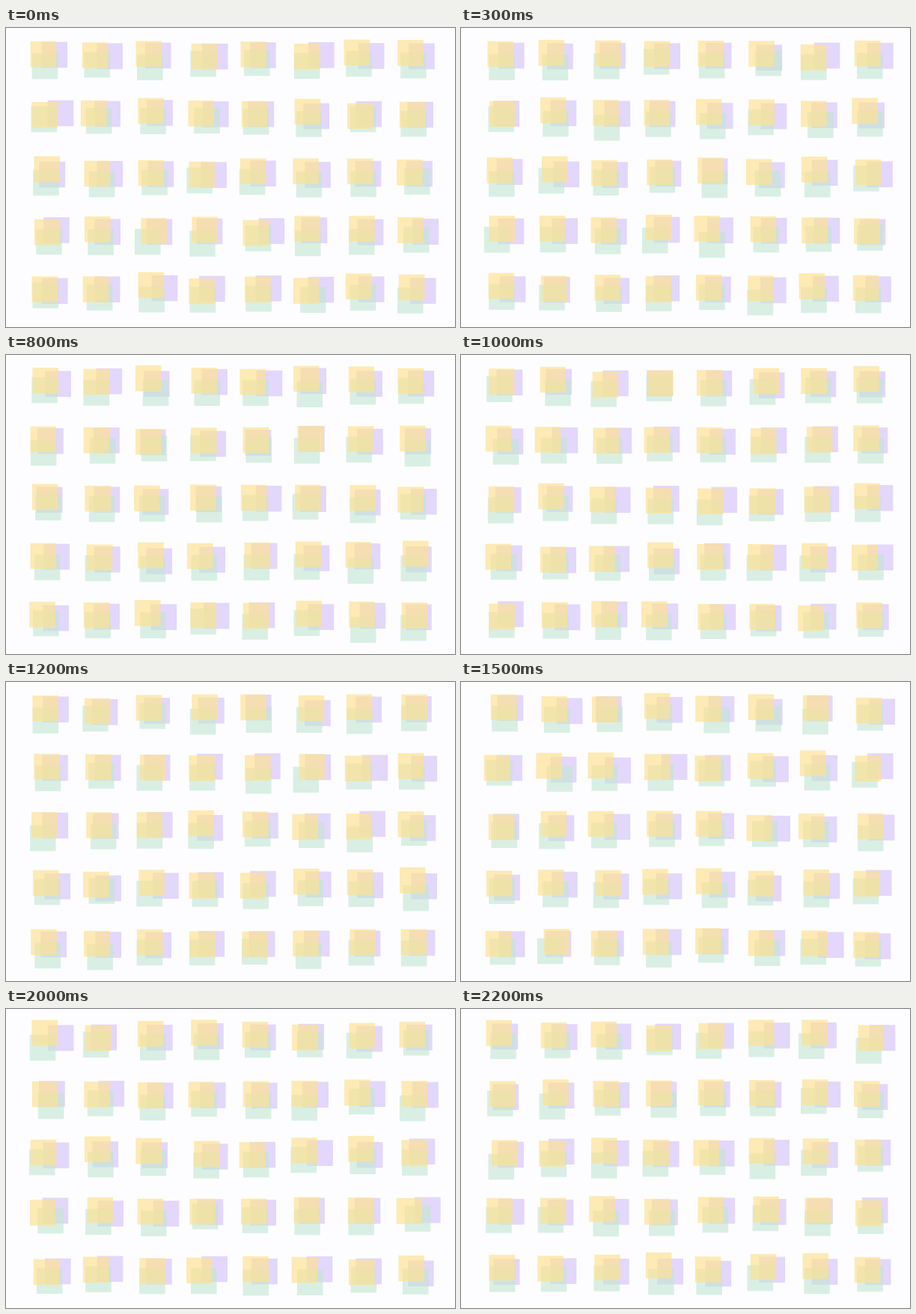
Write an HTML page with a canvas that moves like this. It is 600 by 400 pixels and loops after 2300 ms.

```html
<!DOCTYPE html>
<html>
<head>
<meta charset="utf-8">
<style>
html, body { margin: 0; width: 100%; height: 100%; overflow: hidden; background: #fdfdff; }
canvas { display: block; }
</style>
</head>
<body>
<canvas id="stage" width="600" height="400"></canvas>
<script>
const ctx = document.getElementById('stage').getContext('2d');
const STEP = 100, STEPS = 23, SIZE = 34.6;

// Back to front: mean position in the first cell and spread of the jitter.
const layers = [
  { color: 'rgba(210,190,249,.6)', x: 48.2, y: 20.2, sx: 3.6, sy: 1.7 },
  { color: 'rgba(193,231,210,.6)', x: 37.2, y: 32.4, sx: 3, sy: 2.5 },
  { color: 'rgba(254,226,143,.67)', x: 34.8, y: 17.8, sx: 2.5, sy: 2 }
];

function seeded(seed) {
  return () => {
    seed = (seed + 0x6D2B79F5) | 0;
    let t = Math.imul(seed ^ (seed >>> 15), seed | 1);
    t ^= t + Math.imul(t ^ (t >>> 7), t | 61);
    return ((t ^ (t >>> 14)) >>> 0) / 4294967296;
  };
}

// Bell-shaped noise with unit deviation.
const bell = rnd => 2 * (rnd() + rnd() + rnd() - 1.5);

function draw(step) {
  const rnd = seeded(step * 7919 + 17);
  ctx.fillStyle = '#fdfdff';
  ctx.fillRect(0, 0, 600, 400);
  for (let row = 0; row < 5; row++) {
    for (let col = 0; col < 8; col++) {
      for (const { color, x, y, sx, sy } of layers) {
        ctx.fillStyle = color;
        ctx.fillRect(x + col * 70.1 + sx * bell(rnd), y + row * 78.2 + sy * bell(rnd), SIZE, SIZE);
      }
    }
  }
}

let start, shown = -1;
function tick() {
  const now = performance.now();
  start ??= now;
  const step = Math.floor((now - start) / STEP) % STEPS;
  if (step !== shown) draw(shown = step);
  requestAnimationFrame(tick);
}
tick();
</script>
</body>
</html>
```
